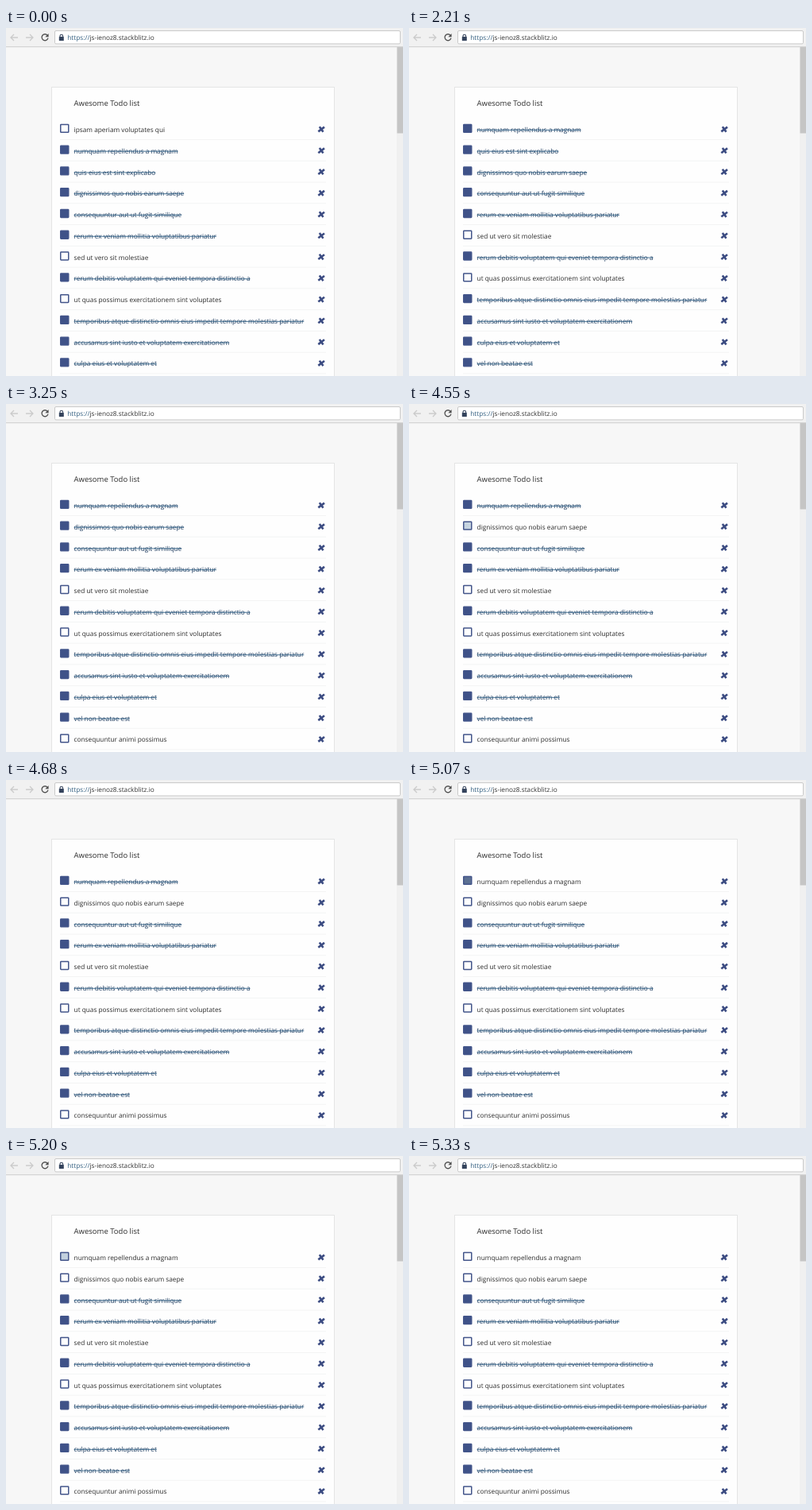
Animation, 500 px wide and 438 px high, one loop 5.59 s. Source, as an HTML page:

```html
<!DOCTYPE html>
<html lang="en">
<head>
<meta charset="utf-8">
<title>Todo list</title>
<style>
  html, body { margin: 0; width: 100%; height: 100%; overflow: hidden; background: #f7f7f7; }
  svg { display: block; font: 8.27px "Open Sans", "Noto Sans", sans-serif; text-rendering: geometricPrecision; }
  .item text { fill: #2c2c2c; }
  .item.done text { fill: #1f3d60; }
  .strike { stroke: #2f6086; stroke-width: .9; visibility: hidden; }
  .done .strike { visibility: visible; }
  .box { stroke: #43558a; stroke-width: 1.5; }
  .cross { fill: none; stroke: #3c4c82; stroke-width: 2.6; }
  .rule { stroke: #f3f4f4; }
</style>
</head>
<body>
<svg width="500" height="438" viewBox="0 0 500 438">
  <!-- card -->
  <rect x="57.5" y="74.5" width="356" height="380" fill="#fefefe" stroke="#e4e5e5"/>
  <text x="85.6" y="98" font-size="9.5" fill="#2c2c2c">Awesome Todo list</text>
  <g id="list"></g>

  <!-- scrollbar -->
  <rect x="492" y="24" width="8" height="414" fill="#f0f0f0"/>
  <rect x="492.5" y="24" width="7.5" height="108.5" fill="#c5c5c5"/>

  <!-- browser bar -->
  <rect width="500" height="23.2" fill="#f1f1f1"/>
  <rect y="23.2" width="500" height="1" fill="#cdcdcd"/>
  <rect x="61.5" y="3.5" width="435" height="16.4" rx="1.5" fill="#fff" stroke="#c9c9c9"/>
  <g fill="none" stroke="#cbcbcb" stroke-width="1.3">
    <path d="M15 12H6.2M10 8L6 12L10 16"/>
    <path d="M25 12H33.8M30 8L34 12L30 16"/>
    <path d="M52.2 9.2A4 4 0 1 0 53 12.7" stroke="#505050"/>
  </g>
  <path d="M53.6 7V11.2H49.4Z" fill="#505050"/>
  <rect x="66.8" y="11" width="6" height="5" rx=".5" fill="#34435c"/>
  <path d="M68 11.5V10A1.8 1.8 0 0 1 71.6 10V11.5" fill="none" stroke="#34435c" stroke-width="1.1"/>
  <text x="77.3" y="15" font-size="8.28" fill="#333"><tspan fill="#335f80">https://</tspan>js-ienoz8.stackblitz.io</text>
</svg>
<script>
const LOOP = 5590, PITCH = 26.77, CHECKED = "#3f5288", CLEAR = "#fefefe";

// removed: time the item leaves; fade: [time, box colour] steps after unchecking
const items = [
  { text: "ipsam aperiam voluptates qui", open: true, removed: 2210 },
  { text: "numquam repellendus a magnam", fade: [[5070, "#5c7092"], [5200, "#c3d1de"], [5330, CLEAR]] },
  { text: "quis eius est sint explicabo", removed: 3250 },
  { text: "dignissimos quo nobis earum saepe", fade: [[4550, "#c6d4e0"], [4680, CLEAR]] },
  { text: "consequuntur aut ut fugit similique" },
  { text: "rerum ex veniam mollitia voluptatibus pariatur" },
  { text: "sed ut vero sit molestiae", open: true },
  { text: "rerum debitis voluptatem qui eveniet tempora distinctio a" },
  { text: "ut quas possimus exercitationem sint voluptates", open: true },
  { text: "temporibus atque distinctio omnis eius impedit tempore molestias pariatur" },
  { text: "accusamus sint iusto et voluptatem exercitationem" },
  { text: "culpa eius et voluptatem et" },
  { text: "vel non beatae est" },
  { text: "consequuntur animi possimus", open: true }
];

const list = document.getElementById("list");
list.innerHTML = items.map(item => `<g class="item">
  <rect class="box" x="68.75" y="121.5" width="10" height="9.8" rx=".6"/>
  <text x="85.6" y="131">${item.text}</text>
  <line class="strike" x1="85.6" y1="128.4" y2="128.4"/>
  <path class="cross" d="M393.3 130.4L401 124.6M394.8 124.2L399.5 130.8"/>
  <path class="rule" d="M68 140.5H403"/>
</g>`).join("");

items.forEach((item, i) => {
  item.row = list.children[i];
  item.box = item.row.querySelector(".box");
  const width = item.row.querySelector("text").getComputedTextLength();
  item.row.querySelector(".strike").setAttribute("x2", 85.6 + width);
});

function draw(now) {
  const t = now % LOOP;
  let y = 0;
  for (const { row, box, open, removed = Infinity, fade = [] } of items) {
    const gone = t >= removed;
    row.style.display = gone ? "none" : "";
    if (gone) continue;
    const step = fade.filter(([time]) => t >= time).pop();
    row.classList.toggle("done", !open && !step);
    box.style.fill = open ? CLEAR : step ? step[1] : CHECKED;
    row.setAttribute("transform", `translate(0 ${y})`);
    y += PITCH;
  }
}

const start = performance.now();
function tick() {
  draw(performance.now() - start);
  requestAnimationFrame(tick);
}
tick();
</script>
</body>
</html>
```
